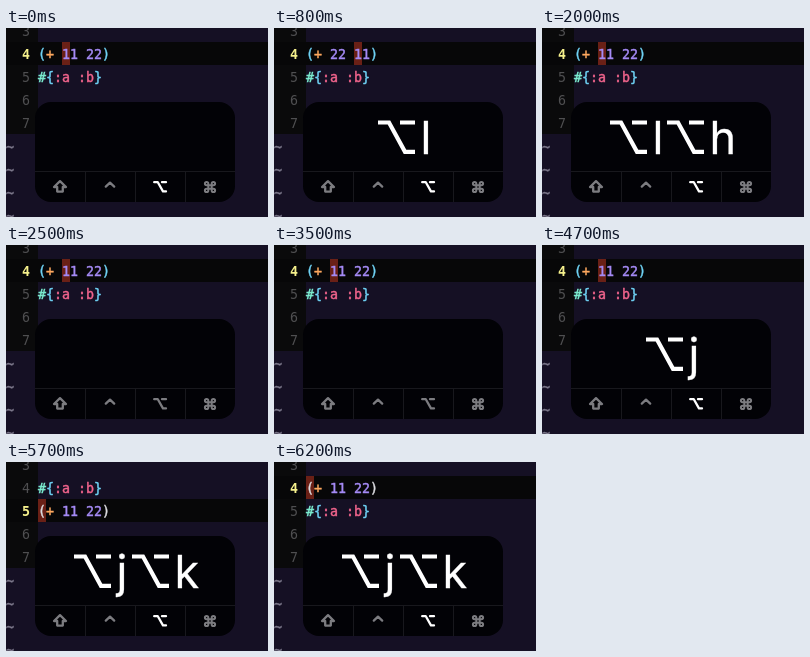
An HTML page that plays this animation: 262 px wide and 189 px high, repeating every 7000 ms.

```html
<!DOCTYPE html>
<html lang="en">
<head>
<meta charset="utf-8">
<title>Moving forms in an editor</title>
<style>
  html, body { margin: 0; width: 100%; height: 100%; overflow: hidden; background: #151024; }
  svg { display: block; width: 262px; height: 189px; }
  .code { font: 13.3px "DejaVu Sans Mono", monospace; white-space: pre; }
  .heavy { stroke-width: .45px; }
  .cast { font: 400 45px Inter, sans-serif; fill: #fff; stroke: #fff; stroke-width: .3px; }
  .line { fill: none; stroke-linejoin: round; stroke-linecap: round; }
  .sign { fill: none; stroke-width: 4.2px; }
</style>
</head>
<body>
<svg viewBox="0 0 262 189">
  <rect width="262" height="189" fill="#151024"/>
  <rect width="32" height="106" fill="#0a0a0b"/>
  <g id="editor" class="code"></g>
  <rect x="29" y="74" width="200" height="100" rx="16" fill="#020206"/>
  <path d="M29 143.5H229M79.5 143V174M129.5 143V174M179.5 143V174" stroke="#18181d"/>
  <g id="cast" class="cast"></g>
  <g class="line" stroke="#7c7c80" stroke-width="2.3">
    <path d="M54 153.2L60 159H56.8V163.6H51.2V159H48Z"/>
    <path d="M99.8 158.6L104 154.6L108.2 158.6"/>
    <path id="option" d="M148.2 154.2H151.8L157 163.4H160M156 154.2H160"/>
    <path stroke-width="2" d="M202.3 157.3V155.6a1.7 1.7 0 1 0-1.7 1.7H207.4a1.7 1.7 0 1 0-1.7-1.7V162.4a1.7 1.7 0 1 0 1.7-1.7H200.6a1.7 1.7 0 1 0 1.7 1.7Z"/>
  </g>
</svg>
<script>
const LOOP = 7000, CELL = 8, ROW = 23;
const $ = id => document.getElementById(id);
const rowTop = n => 14 + (n - 4) * ROW;

const colors = {
  paren: '#6fd3f5', match: '#dcdce0', plus: '#ffa95f',
  number: '#a58af5', hash: '#7df0d2', brace: '#6fd3f5', keyword: '#f0648c'
};

const glyphs = (text, x, row, fill, extra = '') =>
  `<text x="${x}" y="${rowTop(row) + 17}" fill="${fill}" ${extra}>${text}</text>`;

const heavy = (text, x, row, fill) => glyphs(text, x, row, fill, `class="heavy" stroke="${fill}"`);

const tokens = (row, list) => list.map(([col, text, color]) =>
  heavy(text, 32 + col * CELL, row, colors[color])).join('');

const sumForm = (row, a, b, paren) => tokens(row, [
  [0, '(', paren], [1, '+', 'plus'], [3, a, 'number'], [6, b, 'number'], [8, ')', paren]
]);

const setForm = row => tokens(row, [
  [0, '#', 'hash'], [1, '{', 'brace'], [2, ':a', 'keyword'], [5, ':b', 'keyword'], [7, '}', 'brace']
]);

function editor({ a, b, row, col }) {
  const y = rowTop(row);
  let out = `<rect y="${y}" width="262" height="${ROW}" fill="#070708"/>` +
    `<rect x="${32 + col * CELL}" y="${y}" width="${CELL}" height="${ROW}" fill="#6a2016"/>`;
  for (let n = 3; n <= 7; n++)
    out += n === row ? glyphs(n, 16, n, '#f5f08c', 'font-weight="bold"') : glyphs(n, 16, n, '#4f4f51');
  for (let n = 8; n <= 11; n++) out += `<g transform="translate(0 1)">${heavy('~', 0, n, '#7d798c')}</g>`;
  return out + sumForm(row, a, b, col ? 'paren' : 'match') + setForm(9 - row);
}

// Each pair is the option sign followed by a letter.
function cast(keys) {
  const left = keys.length > 1 ? 68 : 104;
  return [...keys].map((key, i) => {
    const x = left + i * (keys[0] === 'j' ? 58 : 57);
    return `<path class="sign"
      d="M${x} 94.5H${x + 11}L${x + 27} 123.8H${x + 37}M${x + 22} 94.5H${x + 37}"/>
      <text x="${x + 42.5}" y="126">${key}</text>`;
  }).join('');
}

const start = { a: 11, b: 22, row: 4, col: 3 };
const swapped = { a: 22, b: 11, row: 4, col: 6 };
const below = { a: 11, b: 22, row: 5, col: 0 };
const above = { ...below, row: 4 };

const tracks = [
  { steps: [[0, start], [400, swapped], [1300, start], [4800, below], [5800, above]],
    show: v => $('editor').innerHTML = editor(v) },
  { steps: [[0, ''], [300, 'l'], [1200, 'lh'], [2400, ''], [4700, 'j'], [5600, 'jk']],
    show: v => $('cast').innerHTML = cast(v) },
  { steps: [[0, '#fff'], [2300, '#7c7c80'], [3900, '#fff']],
    show: v => $('option').setAttribute('stroke', v) }
];

function draw() {
  const t = performance.now() % LOOP;
  for (const track of tracks) {
    const value = track.steps.findLast(([at]) => at <= t)[1];
    if (value !== track.value) track.show(track.value = value);
  }
  requestAnimationFrame(draw);
}
draw();
</script>
</body>
</html>
```
